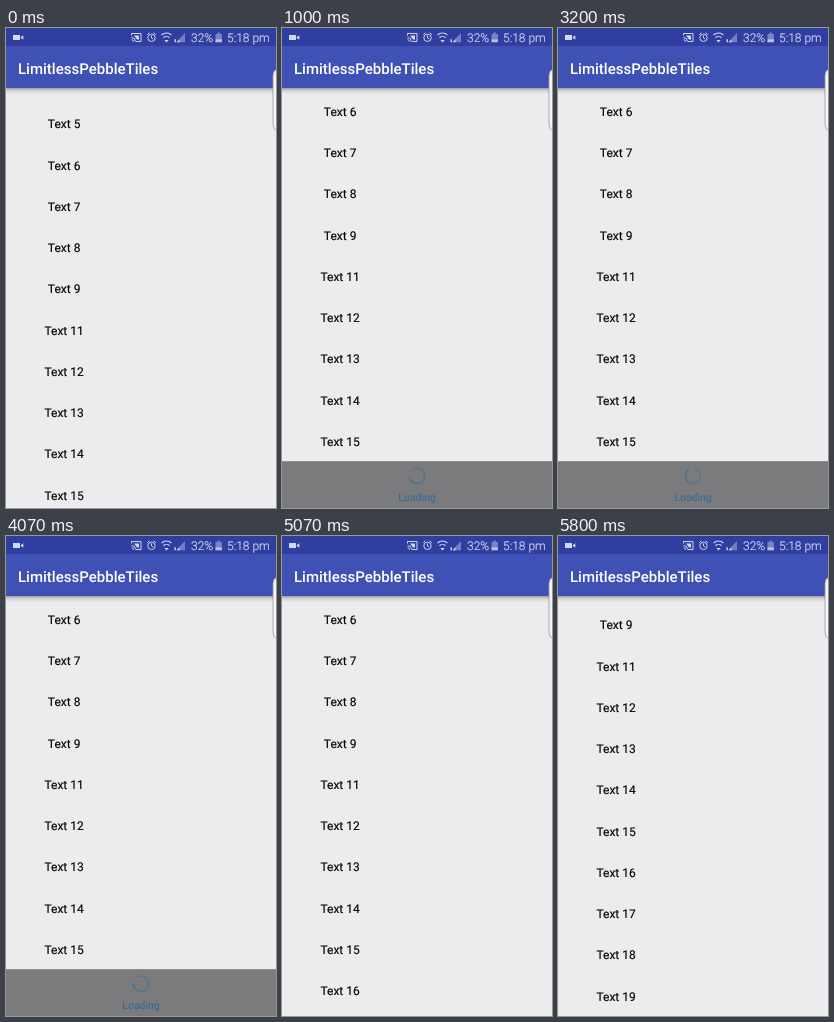
Animation, 270 px wide and 480 px high, one loop 5.87 s. Source, as an HTML page:

```html
<!DOCTYPE html>
<html lang="en">
<head>
<meta charset="utf-8">
<style>
  html, body { margin: 0; width: 100%; height: 100%; overflow: hidden; background: #ecebed; }
  svg { display: block; width: 100%; height: 100%; font-family: Roboto, sans-serif; text-rendering: geometricPrecision; }
</style>
</head>
<body>
<svg viewBox="0 0 270 480">
  <defs>
    <linearGradient id="shade" x2="0" y2="1">
      <stop offset="0" stop-color="#000" stop-opacity=".34"/>
      <stop offset=".4" stop-color="#000" stop-opacity=".12"/>
      <stop offset="1" stop-color="#000" stop-opacity="0"/>
    </linearGradient>
  </defs>
  <rect width="270" height="480" fill="#ecebed"/>
  <g id="rows" font-size="12" fill="#000" stroke="#000" stroke-width=".15" text-anchor="middle"></g>

  <g id="footer">
    <rect width="270" height="48" fill="#7b7a7c"/>
    <g id="spinner" fill="none" stroke="#2d719f" stroke-width="1.3"></g>
    <text x="135" y="40" font-size="10.5" fill="#2b6c99" text-anchor="middle">Loading</text>
  </g>

  <rect y="60" width="270" height="6" fill="url(#shade)"/>
  <rect width="270" height="60" fill="#3f51b5"/>
  <rect width="270" height="18" fill="#303f9f"/>
  <text x="12" y="45.8" font-size="15" font-weight="500" fill="#fff">LimitlessPebbleTiles</text>

  <g fill="#d3d7f0">
    <path d="M7 7h7v5h-7zM14.3 9.5l3-2.3v4.6z"/>
    <g font-size="12" font-weight="300" stroke="#d3d7f0" stroke-width=".2">
      <text x="185" y="14">32%</text>
      <text x="221" y="14">5:18 pm</text>
    </g>
    <path d="M209.5 6h2v-1.5h2.4V6h2v8.2h-6.4z" opacity=".45"/>
    <path d="M209.5 11.3h6.4v2.9h-6.4z" opacity=".7"/>
    <path d="M170 14.2h9V5z" opacity=".42"/>
    <path d="M168.5 14.2v-3h1.4v3zM170.8 14.2h2.7v-2.7z"/>
    <path d="M158.3 12h4.4l-2.2 2.6z"/>
    <path d="M128 7.5h5v4h-2z"/>
  </g>
  <g fill="none" stroke="#cfd3ee">
    <path d="M125.5 7.5V5.5h9.5v8h-5M125.5 9.5a4 4 0 0 1 4 4M125.5 11.7a2 2 0 0 1 2 2"/>
    <circle cx="145.5" cy="9.8" r="3.7"/>
    <path d="M145.5 7.5v2.5l1.7 1M141.3 6.7l2-2M149.7 6.7l-2-2"/>
    <path d="M155.6 7a7 7 0 0 1 9.8 0M157.5 9.7a4.3 4.3 0 0 1 6 0" stroke-width="1.2"/>
  </g>
  <path d="M271 41.5q-4 1-4 6v49q0 5 4 6z" fill="#f3f3f5" stroke="#96969f" stroke-width=".8"/>
</svg>
<script>
const LOOP = 5870, TICK = 200 / 3, PITCH = 41.25;
const LIST_END = 53.6, FIRST_LOAD = 10, LOADED_AT = 4930;
const $ = id => document.getElementById(id);
const progress = (t, from, length) => Math.max(0, Math.min(1, (t - from) / length));

function add(parent, tag, attrs, text = '') {
  const el = document.createElementNS('http://www.w3.org/2000/svg', tag);
  for (const key in attrs) el.setAttribute(key, attrs[key]);
  el.textContent = text;
  return parent.appendChild(el);
}

// The list has no item 10.
const rows = Array.from({ length: 15 }, (_, i) =>
  add($('rows'), 'text', {}, `Text ${i < 5 ? i + 5 : i + 6}`));

// Short arcs of rising opacity form the spinner's fading tail.
const ARCS = 12, SWEEP = 310, RADIUS = 7.6;
const point = deg => {
  const a = deg * Math.PI / 180;
  return `${(RADIUS * Math.cos(a)).toFixed(2)} ${(RADIUS * Math.sin(a)).toFixed(2)}`;
};
for (let i = 0; i < ARCS; i++) {
  const from = i * SWEEP / ARCS, to = (i + 1) * SWEEP / ARCS;
  add($('spinner'), 'path', {
    d: `M${point(from)}A${RADIUS} ${RADIUS} 0 0 1 ${point(to)}`,
    opacity: 0.3 + 0.5 * (i + 1) / ARCS
  });
}

// The first fling stops dead at the end of the list; the second is still gaining speed.
function scrollAt(t) {
  const settle = progress(t, 0, 130) ** 0.7;
  const fling = progress(t, 5670, 130) ** 1.3;
  return LIST_END * settle + 118.4 * fling;
}

function draw(time) {
  const t = Math.floor((time % LOOP + 4) / TICK) * TICK;
  const scroll = scrollAt(t);
  const loaded = t >= LOADED_AT;
  rows.forEach((row, i) => {
    // A hair of rotation stops glyphs from snapping to whole pixels.
    row.setAttribute('transform', `translate(58.1 ${100.3 + PITCH * i - scroll}) rotate(.02)`);
    row.setAttribute('visibility', i < FIRST_LOAD || loaded ? 'visible' : 'hidden');
  });
  $('footer').setAttribute('transform', `translate(0 ${486.8 - scroll})`);
  $('footer').setAttribute('visibility', loaded ? 'hidden' : 'visible');
  $('spinner').setAttribute('transform', `translate(135 14.6) rotate(${(t - 2130) * 0.36 - 100})`);
}

const start = performance.now();
function frame() {
  draw(performance.now() - start);
  requestAnimationFrame(frame);
}
draw(0);
requestAnimationFrame(frame);
</script>
</body>
</html>
```
